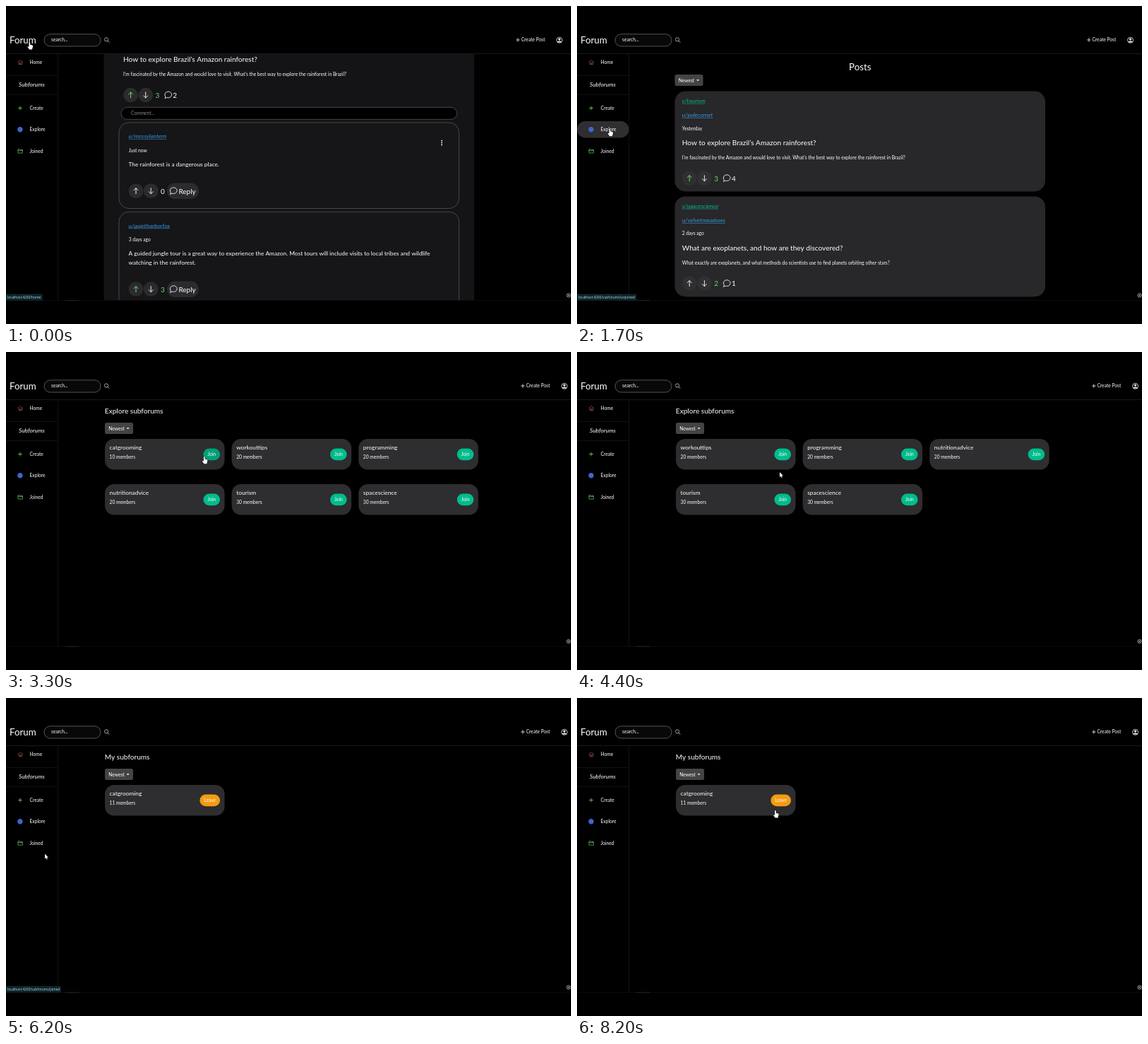
Recreate the animation shown at these times as an HTML page with a canvas. Size 800x450 px, loop 8300 ms.

```html
<!DOCTYPE html>
<html lang="en">
<head>
<meta charset="utf-8">
<title>Forum</title>
<style>
html, body { margin: 0; width: 100%; height: 100%; overflow: hidden; background: #000; }
canvas { display: block; width: 800px; height: 450px; }
</style>
</head>
<body>
<canvas id="stage"></canvas>
<script>
const canvas = document.getElementById('stage');
const ctx = canvas.getContext('2d');
const ratio = window.devicePixelRatio || 1;
canvas.width = 800 * ratio;
canvas.height = 450 * ratio;

const LOOP = 8300;
const OPEN_HOME = 200, OPEN_EXPLORE = 1900, JOIN = 3900, OPEN_JOINED = 5800;
const GREEN = '#72d66f', TEAL = '#00bc8c', BLUE = '#3498db', ORANGE = '#f39c12';

// Pointer tip: time, x, y
const PATH = [
  [0, 33.5, 51], [950, 33.5, 51], [1650, 46.5, 173.5], [1900, 46.5, 174],
  [2100, 48, 185], [2600, 50, 186], [3400, 291, 146], [3950, 291, 146],
  [4400, 287, 170], [4600, 280, 174], [5400, 45, 205], [5850, 45, 206],
  [6200, 55, 220.5], [7200, 62, 226], [7600, 170, 228], [8150, 281, 159], [8300, 281, 159]
];
const STATUS = [
  [0, 1050, '/home', 51.5], [1550, 2800, '/subforums/unjoined', 83.5],
  [5500, 6500, '/subforums/joined', 77.5]
];
const FORUMS = [['catgrooming', 10], ['workouttips', 20], ['programming', 20],
  ['nutritionadvice', 20], ['tourism', 30], ['spacescience', 30]];

let pointer, linked;

function pointerAt(t) {
  let i = 1;
  while (i < PATH.length - 1 && PATH[i][0] < t) i++;
  const [t0, x0, y0] = PATH[i - 1], [t1, x1, y1] = PATH[i];
  const p = (t - t0) / (t1 - t0), e = p * p * (3 - 2 * p);
  return { x: x0 + (x1 - x0) * e, y: y0 + (y1 - y0) * e };
}

function over(x, y, w, h) {
  return pointer.x >= x && pointer.x <= x + w && pointer.y >= y && pointer.y <= y + h;
}

function link(x, y, w, h) {
  const hit = over(x, y, w, h);
  linked = linked || hit;
  return hit;
}

function text(s, x, y, size = 6.67, color = '#fff', style = '', align = 'left') {
  ctx.font = `${style} ${size}px Lato, sans-serif`;
  ctx.fillStyle = color;
  ctx.textAlign = align;
  ctx.fillText(s, x, y);
}

function underlined(s, x, y, color) {
  text(s, x, y, 8.33, color, 'italic');
  ctx.fillRect(x, y + 1, ctx.measureText(s).width, 0.55);
}

function box(x, y, w, h, r, fill, stroke, line = 0.7) {
  ctx.beginPath();
  ctx.roundRect(x, y, w, h, r);
  if (fill) { ctx.fillStyle = fill; ctx.fill(); }
  if (stroke) { ctx.strokeStyle = stroke; ctx.lineWidth = line; ctx.stroke(); }
}

function disc(x, y, r, fill) {
  ctx.beginPath();
  ctx.arc(x, y, r, 0, Math.PI * 2);
  ctx.fillStyle = fill;
  ctx.fill();
}

function ring(x, y, r, color, width = 0.8) {
  ctx.beginPath();
  ctx.arc(x, y, r, 0, Math.PI * 2);
  ctx.strokeStyle = color;
  ctx.lineWidth = width;
  ctx.stroke();
}

function stroke(path, color, width = 0.8, x = 0, y = 0) {
  ctx.save();
  ctx.translate(x, y);
  ctx.strokeStyle = color;
  ctx.lineWidth = width;
  ctx.lineCap = ctx.lineJoin = 'round';
  ctx.stroke(new Path2D(path));
  ctx.restore();
}

function plus(x, y, r, color) {
  stroke(`M${-r} 0H${r}M0 ${-r}V${r}`, color, 0.9, x, y);
}

function bubble(x, y) {
  stroke('M-4.3 4.5L-3.7 2.2A4.9 4.4 0 1 1 -1.7 3.6Z', '#eee', 0.9, x, y);
}

function votes(x, y, count, upColor, countColor, fill) {
  disc(x, y, 10.4, fill);
  disc(x + 21.2, y, 10.4, fill);
  stroke('M0 4V-4M-3 -1L0 -4L3 -1', upColor, 1, x, y);
  stroke('M0 -4V4M-3 1L0 4L3 1', '#eee', 1, x + 21.2, y);
  text(count, x + 35, y + 3.8, 10, countColor);
}

function newest(x, y) {
  box(x, y, 40, 16, 2.5, '#444');
  link(x, y, 40, 16);
  text('Newest', x + 5.3, y + 10.5);
  ctx.beginPath();
  ctx.moveTo(x + 30.6, y + 7.2);
  ctx.lineTo(x + 34.6, y + 7.2);
  ctx.lineTo(x + 32.6, y + 9.3);
  ctx.fill();
}

function comment(y, height, user, age, lines, count, voted) {
  box(160, y, 481.5, height, 14, '#161518', '#5d5c60');
  underlined(user, 173.5, y + 22.3, BLUE);
  text(age, 173.7, y + 41.6);
  lines.forEach((s, i) => text(s, 173.5, y + 62 + i * 12.7, 8.33));
  const cy = y + 96.7 + (lines.length - 1) * 12.7;
  votes(184, cy, count, voted ? GREEN : '#eee', voted ? GREEN : '#fff', '#2b2a2d');
  box(228, cy - 11.3, 45, 22.6, 11.3, '#2b2a2d');
  bubble(237, cy);
  text('Reply', 244.4, cy + 3.8, 10);
}

function postPage() {
  ctx.fillStyle = '#141316';
  ctx.fillRect(138.5, 68, 524.5, 348.5);
  text('How to explore Brazil’s Amazon rainforest?', 166, 79, 10.1);
  text("I'm fascinated by the Amazon and would love to visit. What's the best way to explore the rainforest in Brazil?", 166, 99.2);
  votes(176.5, 126, '3', GREEN, GREEN, '#2b2a2d');
  bubble(229.5, 126);
  text('2', 236.3, 129.8, 10);
  box(163, 143.4, 475.5, 17, 8.5, '#000', '#5d5c60');
  text('Comment...', 177, 154.2, 6.67, '#858585');
  comment(165, 121.5, 'u/mossylantern', 'Just now', ['The rainforest is a dangerous place.'], '0', false);
  for (let i = -1; i < 2; i++) disc(617, 193.6 + i * 2.8, 0.95, '#fff');
  comment(291.3, 140, 'u/quietharborfox', '3 days ago', [
    'A guided jungle tour is a great way to experience the Amazon. Most tours will include visits to local tribes and wildlife',
    'watching in the rainforest.'
  ], '3', true);
}

function postCard(y, forum, user, age, title, body, count, replies, voted) {
  box(138.5, y, 524.5, 142, 15, '#282729');
  link(138.5, y, 524.5, 142);
  underlined(forum, 148.8, y + 16.4, TEAL);
  underlined(user, 148.8, y + 36.6, BLUE);
  text(age, 148.8, y + 55);
  text(title, 148.8, y + 76.4, 10.1);
  text(body, 148.8, y + 96.1);
  votes(159.2, y + 123.2, count, voted ? GREEN : '#eee', GREEN, '#303032');
  bubble(212, y + 123.2);
  text(replies, 219, y + 127, 10);
}

function homePage() {
  text('Posts', 400.8, 90.7, 13.33, '#fff', '', 'center');
  newest(138.5, 97);
  postCard(120.5, 's/tourism', 'u/palecomet', 'Yesterday', 'How to explore Brazil’s Amazon rainforest?',
    "I'm fascinated by the Amazon and would love to visit. What's the best way to explore the rainforest in Brazil?", '3', '4', true);
  postCard(269.4, 's/spacescience', 'u/velvetmeadows', '2 days ago', 'What are exoplanets, and how are they discovered?',
    'What exactly are exoplanets, and what methods do scientists use to find planets orbiting other stars?', '2', '1', false);
}

function forumPage(title, forums, action) {
  const joining = action === 'Join', w = joining ? 23.6 : 28.6;
  text(title, 139.8, 87.3, 10.1);
  newest(140, 100);
  forums.forEach(([name, members], i) => {
    const x = 140 + (i % 3) * 179.6, y = 123 + Math.floor(i / 3) * 64;
    box(x, y, 169.5, 43.5, 13, '#2e2d2f');
    link(x, y, 169.5, 43.5);
    text(name, x + 6.6, y + 15, 8.4);
    text(`${members} members`, x + 6.6, y + 27.7);
    const bx = x + 163 - w, hit = over(bx, y + 13.5, w, 17);
    box(bx, y + 13.5, w, 16.8, 8.4, joining ? (hit ? '#00a077' : TEAL) : (hit ? '#cf850f' : ORANGE));
    text(action, bx + w / 2, y + 24.3, 6.67, '#fff', '', 'center');
  });
}

function header(shift) {
  text('Forum', 5, 53, 13.33);
  link(4, 40, 40, 18);
  box(54, 39.8, 80, 17.2, 8.6, '#080808', '#77777a');
  text('search...', 64, 50.3);
  ring(142, 47.4, 2.6, '#ddd', 0.7);
  stroke('M143.9 49.3L146 51.4', '#ddd', 0.8);
  plus(724.8 + shift, 48, 2.3, '#ddd');
  text('Create Post', 729.4 + shift, 50.4);
  const ux = 783.6 + shift;
  ring(ux, 48.3, 4, '#fff', 0.8);
  disc(ux, 47.1, 1.6, '#fff');
  ctx.beginPath();
  ctx.ellipse(ux, 51.2, 2.9, 1.8, 0, Math.PI, 0);
  ctx.fill();
  ctx.fillStyle = '#1d1f25';
  ctx.fillRect(0, 67, 800, 0.8);
}

function sidebar() {
  ctx.fillStyle = '#19191c';
  ctx.fillRect(73.2, 68, 0.7, 348.5);
  ctx.fillRect(0, 98, 73.5, 0.7);
  ctx.fillRect(0, 125.2, 73.5, 0.7);
  [['Home', 79.6], ['Create', 144.6], ['Explore', 174.8], ['Joined', 205.2]].forEach(([label, y]) => {
    if (over(0, y - 11.7, 73.5, 23.4)) box(0, y - 11.7, 73.5, 23.4, 11.7, '#2f2e30');
    link(0, y - 8, 73.5, 16);
    text(label, 33.5, y + 2.3);
  });
  stroke('M-3.2 -.2L0 -3L3.2 -.2M-2.4 -.6V3H2.4V-.6M-.7 3V.8H.7V3', '#9a5546', 0.7, 20.4, 79.6);
  text('Subforums', 18, 113.5, 8.33, '#fff', 'italic');
  plus(20, 144.5, 2.4, '#6ccb50');
  disc(20, 174.8, 3.7, '#345cc0');
  stroke('M-3.4 0H3.4M0 -3.4C-2 -1 -2 1 0 3.4C2 1 2 -1 0 -3.4', '#6b8ad8', 0.4, 20, 174.8);
  stroke('M-3.2 2.5V-2.5H-.4L.3 -1.8H3.2V2.5ZM-3.2 -.7H3.2', '#58b05a', 0.8, 20.2, 205.2);
}

function footer(t) {
  ctx.fillStyle = '#111113';
  ctx.fillRect(0, 416.3, 800, 0.8);
  ctx.fillStyle = '#29292b';
  ctx.fillRect(83.5, 416.3, 20, 0.9);
  ring(796.6, 409.5, 2.6, '#ccc', 0.8);
  disc(796.6, 409.5, 1, '#ccc');
  const status = STATUS.find(s => t >= s[0] && t < s[1]);
  if (!status) return;
  box(-1, 408, status[3] + 1, 8.3, [0, 1, 0, 0], '#0b252c', '#24424a', 0.4);
  ctx.font = '4.8px "Open Sans", sans-serif';
  ctx.fillStyle = '#cbdadd';
  ctx.textAlign = 'left';
  ctx.fillText('localhost:4200' + status[2], 2, 414);
}

function drawPointer() {
  const hand = 'M-1 .8Q-1 0 -.2 0Q.7 0 .7 .8V3.8L3.8 4.6Q4.8 5 4.6 6L4 8.6L3.4 10.6H-.4L-2.8 7.2Q-3.1 6 -2 6.2L-1 7Z';
  const arrow = 'M0 0V7L1.6 5.6L2.7 8L3.8 7.5L2.7 5.2H4.9Z';
  const shape = new Path2D(linked ? hand : arrow);
  ctx.save();
  ctx.translate(pointer.x, pointer.y);
  ctx.strokeStyle = '#000';
  ctx.lineWidth = 1;
  ctx.stroke(shape);
  ctx.fillStyle = '#fff';
  ctx.fill(shape);
  ctx.restore();
}

function draw(t) {
  pointer = pointerAt(t);
  linked = false;
  ctx.setTransform(ratio, 0, 0, ratio, 0, 0);
  ctx.fillStyle = '#000';
  ctx.fillRect(0, 0, 800, 450);
  ctx.save();
  ctx.beginPath();
  ctx.rect(0, 68, 800, 348.5);
  ctx.clip();
  if (t < OPEN_HOME) postPage();
  else if (t < OPEN_EXPLORE) homePage();
  else if (t < OPEN_JOINED) forumPage('Explore subforums', t < JOIN ? FORUMS : FORUMS.slice(1), 'Join');
  else forumPage('My subforums', [['catgrooming', 11]], 'Leave');
  ctx.restore();
  header(t < OPEN_EXPLORE ? 0 : 7);
  sidebar();
  footer(t);
  drawPointer();
}

const start = performance.now();
function tick() {
  draw((performance.now() - start) % LOOP);
  requestAnimationFrame(tick);
}
tick();
</script>
</body>
</html>
```
